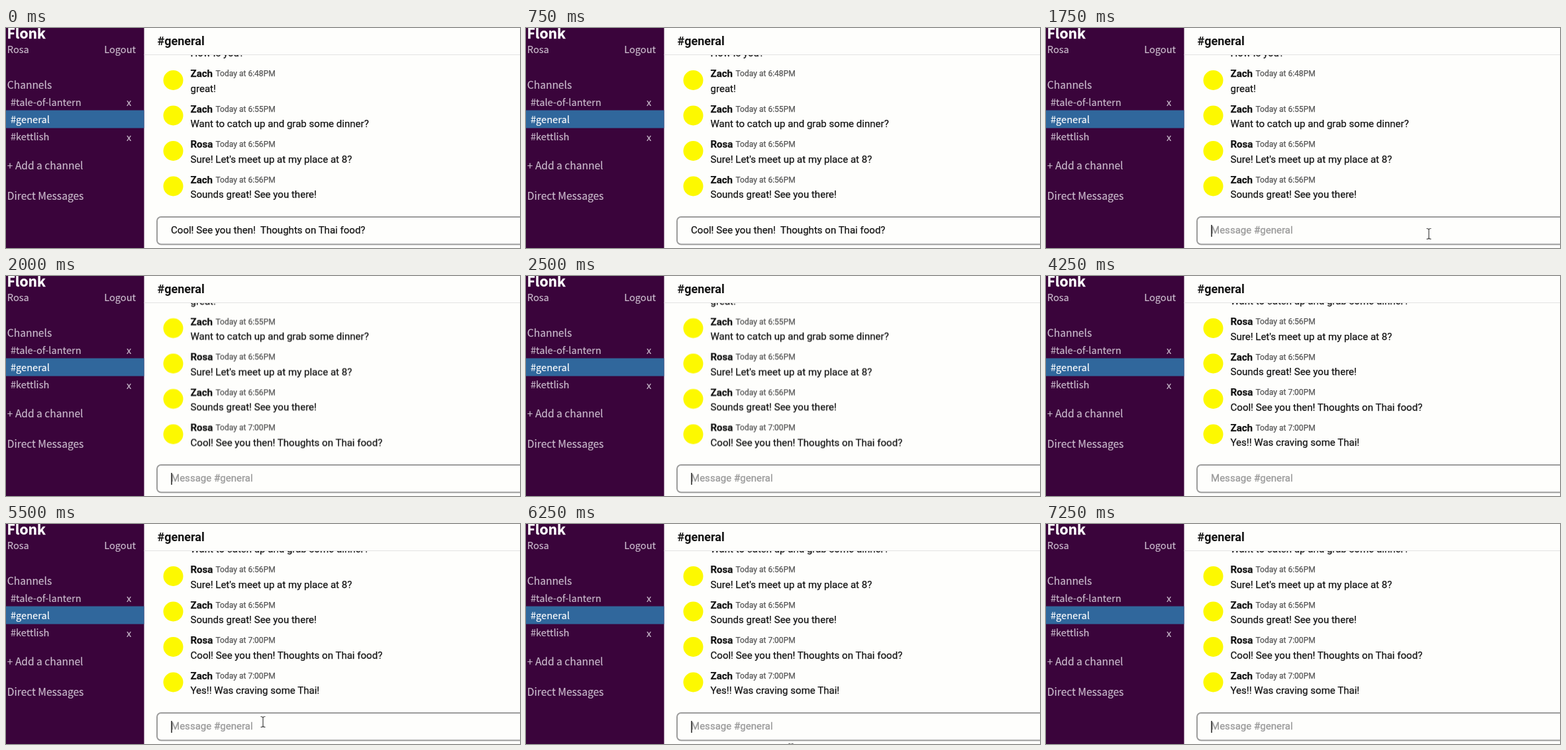
Recreate the animation shown at these times as an HTML page. Size 776 by 333 pixels, loop 7500 ms.

```html
<!DOCTYPE html>
<html lang="en">
<head>
<meta charset="utf-8">
<title>Chat</title>
<style>
  html, body { margin: 0; width: 100%; height: 100%; overflow: hidden; background: #fefefc; }
  svg { display: block; width: 776px; height: 333px; }
  text { white-space: pre; font: 15.06px Roboto, sans-serif; fill: #141414; stroke: #141414; stroke-width: .25; }
  .side text { font: 15.55px "Noto Sans CJK JP", "Noto Sans CJK SC", "Noto Sans CJK", "Noto Sans", sans-serif; fill: #cbbccd; stroke: #cbbccd; stroke-width: .15; }
  .side .brand { font-size: 21px; font-weight: 900; fill: #fff; stroke: #fff; stroke-width: .4; }
  .side .small { font-size: 14.6px; }
  .side .active { fill: #fff; stroke: #fff; }
  .title { font-size: 18px; font-weight: 700; stroke: none; }
  .name { font-weight: 700; }
  .time { font-size: 12.05px; fill: #555; stroke: #555; }
  .hint { fill: #999; stroke: #999; stroke-width: .3; }
  .caret { stroke: #222; stroke-width: 1.5; }
  .beam { fill: none; stroke: #444; stroke-width: 1.2; }

  .loop { animation: 7.5s step-end infinite; }
  #rows { animation-name: rows; }
  #draft { animation-name: draft; }
  #hint { animation-name: hint; }
  #draftCaret { animation-name: draft-caret; }
  #hintCaret { animation-name: hint-caret; }
  #pointer { animation-name: pointer; }

  @keyframes rows {
    0% { transform: translateY(0); }
    26.66% { transform: translateY(-53.5px); }
    56.66%, 100% { transform: translateY(-107px); }
  }
  @keyframes draft { 0% { opacity: 1; } 23.33%, 100% { opacity: 0; } }
  @keyframes hint { 0% { opacity: 0; } 23.33%, 100% { opacity: 1; } }
  @keyframes draft-caret {
    0%, 10%, 23.33%, 100% { opacity: 0; }
    3.33%, 16.66% { opacity: 1; }
  }
  @keyframes hint-caret {
    0%, 30%, 43.33%, 76.66%, 90% { opacity: 0; }
    23.33%, 33.33%, 70%, 83.33%, 96.66%, 100% { opacity: 1; }
  }
  @keyframes pointer {
    0%, 26.66%, 76.66%, 90%, 100% { transform: translate(578px, 400px); }
    23.33% { transform: translate(578px, 303px); }
    73.33% { transform: translate(388px, 291px); }
    83.33% { transform: translate(400px, 332px); }
  }
</style>
</head>
<body>
<svg viewBox="0 0 776 333">
  <defs>
    <clipPath id="list"><rect x="208" y="41" width="568" height="233"/></clipPath>
  </defs>
  <rect width="776" height="333" fill="#fefefc"/>

  <g class="side">
    <rect width="208.5" height="333" fill="#3a043b"/>
    <rect y="124.5" width="208.5" height="27" fill="#30679c"/>
    <text class="brand" x="1.5" y="15.5">Flonk</text>
    <text class="small" x="1.8" y="38">Rosa</text>
    <text class="small" x="196" y="38" text-anchor="end">Logout</text>
    <text x="1.8" y="92">Channels</text>
    <text class="small" x="7" y="118">#tale-of-lantern</text>
    <text class="small" x="182" y="118">x</text>
    <text class="small active" x="7" y="144">#general</text>
    <text class="small" x="7" y="170">#kettlish</text>
    <text class="small" x="182" y="170.5">x</text>
    <text x="1.8" y="214">+ Add a channel</text>
    <text x="1.8" y="259.5">Direct Messages</text>
  </g>

  <text class="title" x="228.5" y="26">#general</text>
  <path d="M208.5 40.5H776" stroke="#e2e2e2"/>
  <g clip-path="url(#list)"><g id="rows" class="loop"></g></g>

  <rect x="228" y="286" width="570" height="41.5" rx="6" fill="#fefefc" stroke="#9c9c9c" stroke-width="2"/>
  <text id="draft" class="loop" x="249" y="311">Cool! See you then!  Thoughts on Thai food?</text>
  <text id="hint" class="loop hint" x="249" y="311">Message #general</text>
  <path id="draftCaret" class="loop caret" d="M544 298V316"/>
  <path id="hintCaret" class="loop caret" d="M250 298V316"/>
  <path id="pointer" class="loop beam" d="M-3.5 .5Q0 .5 0 2.5Q0 .5 3.5 .5M0 2V15M-3.5 16.5Q0 16.5 0 14.5Q0 16.5 3.5 16.5"/>
</svg>
<script>
  const messages = [
    ["Rosa", "6:48PM", "How is you?"],
    ["Zach", "6:48PM", "great!"],
    ["Zach", "6:55PM", "Want to catch up and grab some dinner?"],
    ["Rosa", "6:56PM", "Sure! Let's meet up at my place at 8?"],
    ["Zach", "6:56PM", "Sounds great! See you there!"],
    ["Rosa", "7:00PM", "Cool! See you then! Thoughts on Thai food?"],
    ["Zach", "7:00PM", "Yes!! Was craving some Thai!"]
  ];
  const pitch = 53.5;

  document.getElementById("rows").innerHTML = messages.map(([name, time, text], i) => `
    <g transform="translate(0 ${(i - 1) * pitch})">
      <circle cx="252.5" cy="79" r="15" fill="#fdf900"/>
      <text class="name" x="278.5" y="74">${name}</text>
      <text class="time" x="316.5" y="73">Today at ${time}</text>
      <text x="278.5" y="96.5">${text}</text>
    </g>`).join("");
</script>
</body>
</html>
```
